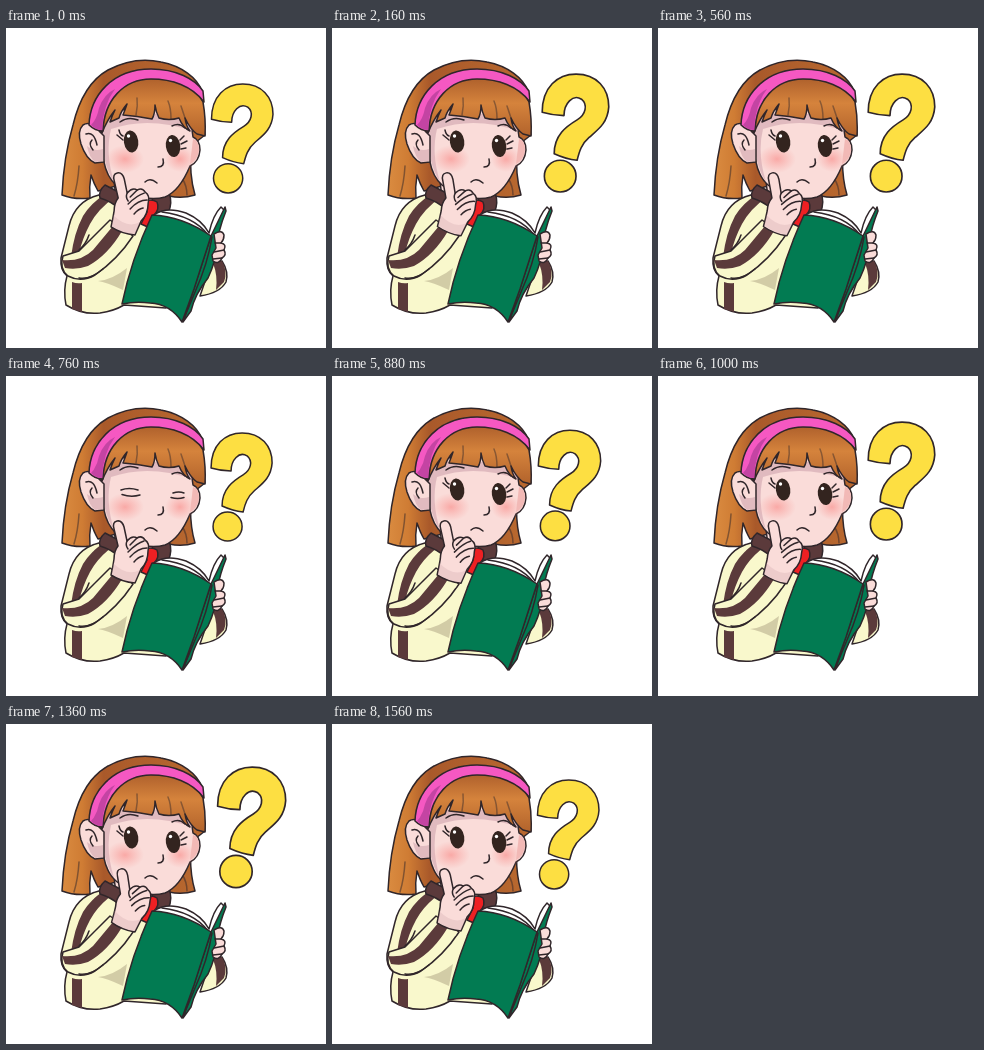
Recreate the animation shown at these times as an HTML page. Size 320 by 320 pixels, loop 1.6 s.

```html
<!DOCTYPE html>
<html>
<head>
<meta charset="utf-8">
<style>
  html, body { margin: 0; width: 100%; height: 100%; overflow: hidden; background: #fff; }
  svg { display: block; width: 100vw; height: 100vh; }
  .ink { stroke: #30262a; stroke-width: 1.5; stroke-linejoin: round; stroke-linecap: round; }
  .line { fill: none; }
  .skin { fill: #fadcd9; }
  .shade { fill: #c79aa5; opacity: .5; }
  .cream { fill: #f9f8cc; }
  .dim { fill: #d2cca6; }
  .brown { fill: #5b3a3b; }
  .green { fill: #027b52; }
</style>
</head>
<body>
<svg viewBox="0 0 320 320">
  <defs>
    <linearGradient id="backHair" x1="58" y1="0" x2="190" y2="0" gradientUnits="userSpaceOnUse">
      <stop offset="0" stop-color="#d98a3f"/>
      <stop offset=".14" stop-color="#cf7c34"/>
      <stop offset=".3" stop-color="#a9592a"/>
      <stop offset="1" stop-color="#b8682f"/>
    </linearGradient>
    <linearGradient id="bangs" x1="0" y1="50" x2="0" y2="106" gradientUnits="userSpaceOnUse">
      <stop offset="0" stop-color="#ae602c"/>
      <stop offset=".45" stop-color="#d5833c"/>
      <stop offset="1" stop-color="#b4652d"/>
    </linearGradient>
    <radialGradient id="blush">
      <stop offset="0" stop-color="#f9a09d" stop-opacity=".85"/>
      <stop offset="1" stop-color="#f9a9a6" stop-opacity="0"/>
    </radialGradient>
  </defs>

  <!-- back hair -->
  <path class="ink" fill="url(#backHair)" d="M56 167C57 145 60 121 67 97C73 72 84 52 102 42C119 33 137 30 155 34C176 38 191 50 196 63L199 107L185 118Q183 147 189 167Q176 171 163 168L110 158L92 163Q88 156 85 147Q83 159 84 170Q69 172 56 167Z"/>
  <path class="ink line" d="M68 168Q72 155 73 138M176 150Q181 158 181 167" opacity=".5"/>

  <!-- jacket -->
  <path class="cream ink" d="M93 167C77 171 67 181 63 198L55 230Q54 242 61 248Q57 262 60 277Q76 287 94 285Q108 283 118 277L160 280L165 190L150 172L108 165Z"/>
  <path class="dim" d="M92 253Q106 252 121 240L117 262Q100 254 92 253Z"/>
  <path class="brown" d="M66 254Q71 256 76 255V284L66 281Z"/>
  <path class="brown" d="M98 167L109 169Q92 181 84 196Q77 209 73 225L65 229Q68 205 77 188Q85 175 98 167Z"/>
  <path class="cream ink" d="M104 192Q90 206 73 223L57 228Q53 241 62 248Q75 255 89 247Q112 231 127 208Z"/>
  <path class="brown" d="M107 198L116 203Q102 227 82 238Q71 242 59 240L56 232Q75 234 87 222Z"/>
  <path class="ink line" d="M73 250Q84 252 97 241M73 222Q80 216 83 207"/>
  <path class="skin ink" d="M108 153L110 170L132 188L154 174L153 158Z"/>
  <path class="brown ink" d="M99 157Q92 163 94 170Q107 174 113 181L122 169ZM146 168L163 165Q167 175 162 185L147 184Z"/>
  <path class="ink" fill="#ee2023" d="M137 174Q145 170 151 174Q154 181 148 187L144 200L135 196L141 184Z"/>

  <!-- head -->
  <path class="skin ink" d="M95 91C95 125 97 146 110 157C124 169 145 173 159 169C171 164 179 150 184 138Q193 134 194 122Q194 112 187 109L184 88Q143 65 95 91Z"/>
  <path class="shade" d="M99 86H186V103Q143 88 105 101Q99 125 108 154Q95 134 96 100Z"/>
  <ellipse cx="119" cy="131" rx="19" ry="14" fill="url(#blush)"/>
  <ellipse cx="174" cy="131" rx="15" ry="13" fill="url(#blush)"/>
  <path fill="#f2b9b6" d="M187 111Q193 112 193 122Q192 132 184 136Z"/>
  <path class="skin ink" d="M94 104Q85 92 77 97Q71 103 75 116Q80 131 89 135L98 134V108Z"/>
  <path class="shade" d="M81 118Q88 124 97 121V133L89 134Q83 129 81 118Z"/>
  <path class="ink line" d="M80 106Q88 103 91 117M86 112Q82 116 87 122"/>
  <path class="ink line" d="M152 139Q159 139 157 131M139 154Q144 149 151 155M114 94Q122 88 132 92M166 98Q173 94 179 100"/>

  <g id="open">
    <g id="eye">
      <ellipse cx="125" cy="113.5" rx="7.2" ry="11" fill="#33241f" transform="rotate(-8 125 113)"/>
      <circle cx="122.5" cy="108" r="1.7" fill="#fff"/>
    </g>
    <use href="#eye" x="42" y="4.5"/>
    <path class="ink line" d="M117 108Q114 107 113 102M117 112L111 107M174 112L178 108M175 116L181 113M175 121L180 120"/>
  </g>
  <g id="shut">
    <path class="ink line" stroke-width="2.4" d="M116 118.5Q125 121.500 134 119M165 121.500Q172 123.500 178 121.500"/>
    <path class="ink line" d="M115 114Q123 111 132 114M167 117Q173 115 178 117"/>
  </g>

  <path class="ink" fill="url(#bangs)" d="M96 105L90 91C94 60 117 48 145 48C174 47 190 60 197 74Q200 91 199 108L191 106Q184 101 179 90Q180 98 184 103Q177 100 173 90Q163 93 153 90Q150 84 149 77Q149 86 146 91Q131 88 117 87Q119 82 121 76Q115 83 113 90L104 94Q106 88 109 82Q101 92 96 105Z"/>
  <path class="ink line" opacity=".45" d="M130 87Q132 78 131 70M165 91Q165 80 162 73M179 90L175 78"/>
  <path class="ink" fill="#f558c2" d="M83 97C84 68 106 41 145 41C170 41 189 51 197 63L198 74C186 58 166 51 145 51C118 51 98 72 97 103Q89 103 83 97Z"/>
  <path fill="#b8409b" opacity=".8" d="M85 97Q91 91 93 80Q98 66 109 61Q97 77 96 102Q90 102 85 97Z"/>

  <!-- book and far hand -->
  <path class="cream ink" d="M194 268Q214 265 220 254Q223 244 216 233L205 236Z"/>
  <path class="brown" d="M207 235L216 233Q222 243 218 254L210 262Q212 248 207 235Z"/>
  <path class="ink" fill="#fff" d="M148 187Q160 178 180 185Q196 192 203 205Q207 187 215 179L219 183L204 218L188 219Z"/>
  <path class="ink line" d="M156 184Q188 188 202 207"/>
  <path class="green ink" d="M219 179L220 183Q212 203 211 218Q210 233 202 250Q189 266 185 283L177 294L188 260L205 208Z"/>
  <path class="green ink" d="M146 187Q176 188 205 208Q198 230 188 261L176 294Q164 276 144 275Q130 273 116 276Q125 232 146 187Z"/>
  <path class="ink line" d="M206 209Q202 235 189 264L177 293"/>
  <path class="skin ink" d="M208 206Q216 201 218 207Q218 212 215 215Q221 216 218 222Q221 227 216 230Q213 237 207 233L206 227L210 220Z"/>
  <path class="ink line" d="M209 215L215 215M208 224L218 222M207 231L216 230"/>

  <!-- near hand -->
  <g id="hand">
    <path class="skin ink" d="M108 153Q106 146 111 145Q116 144 118 151L121 165Q126 159 131 162Q136 159 139 164Q144 167 142 175Q142 186 135 193L129 207Q116 206 105 199Q107 190 108 183Q108 175 112 170Z"/>
    <path class="shade" d="M107 187Q121 201 134 194L129 206Q116 205 106 198Z" style="opacity:.25"/>
    <path class="ink line" d="M121 165Q119 169 122 173M122 176Q131 167 138 165M124 181Q132 172 141 172M131 162L124 169M128 186Q132 181 137 180"/>
  </g>

  <g id="question" class="ink" fill="#fddf42">
    <path d="M205 92C205 69 219 57 236 57C255 57 266 70 266 87C265 102 256 108 248 115C241 121 239 128 237 136Q227 135 216 130C216 113 227 105 237 99C245 94 247 85 241 80C233 75 225 84 225 95Q215 95 205 92Z"/>
    <circle cx="221.500" cy="150.500" r="14.500"/>
  </g>
</svg>
<script>
  const LOOP = 1600, STEP = 40, PEAK = 360, SWING = 840;
  const [question, hand, open, shut] =
    ["question", "hand", "open", "shut"].map(id => document.getElementById(id));

  function draw(now) {
    const t = Math.floor(now % LOOP / STEP) * STEP;
    const swing = .5 + .5 * Math.cos(2 * Math.PI * (t - PEAK) / SWING);
    question.setAttribute("transform",
      `translate(${-25.2 * swing} ${-30 * swing}) scale(${1 + .17 * swing})`);
    hand.setAttribute("transform", `rotate(${5.5 * swing} 115 207)`);
    const blink = t >= 680 && t < 840;
    open.style.display = blink ? "none" : "";
    shut.style.display = blink ? "" : "none";
    requestAnimationFrame(() => draw(performance.now()));
  }
  draw(0);
</script>
</body>
</html>
```
